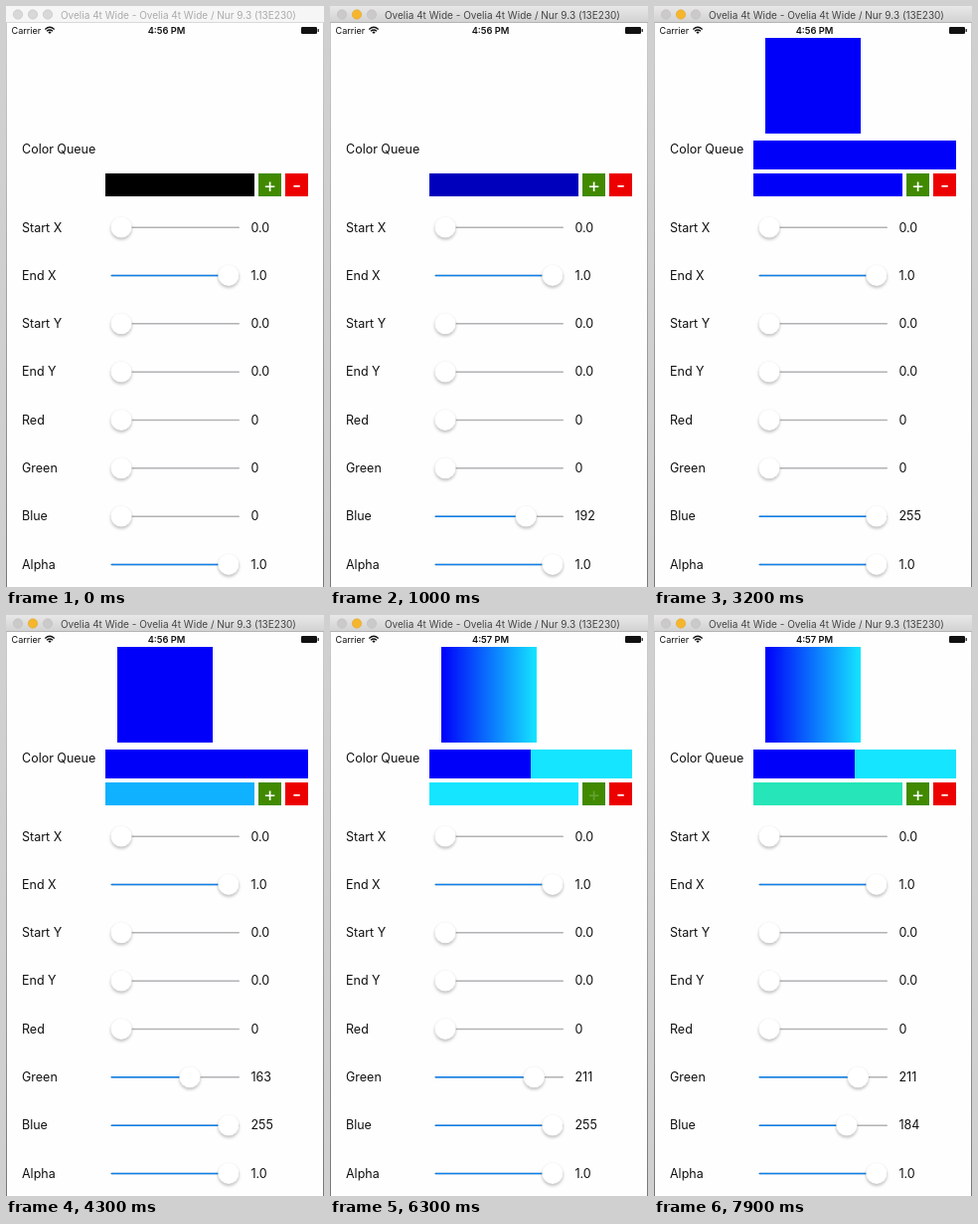
An HTML page that plays this animation: 320 px wide and 583 px high, repeating every 8000 ms.

```html
<!DOCTYPE html>
<html lang="en">
<head>
<meta charset="utf-8">
<title>Gradient editor</title>
<style>
  html, body { margin: 0; width: 100%; height: 100%; overflow: hidden; background: #fff; }
  svg { display: block; width: 100vw; height: 100vh; }
  text { font: 12.5px Inter, Roboto, sans-serif; fill: #111; }
  .title { font-size: 10px; text-anchor: middle; }
  .carrier { font-size: 9.1px; }
  .clock { font-size: 9.3px; font-weight: 600; text-anchor: middle; }
  .sign { font-size: 20px; text-anchor: middle; fill: #fff; }
  .thumb { fill: #fff; filter: drop-shadow(0 2px 1.6px rgba(0, 0, 0, .24)); stroke: #000; stroke-opacity: .05; stroke-width: .5; }
</style>
</head>
<body>
<svg viewBox="0 0 320 583" preserveAspectRatio="none">
  <defs>
    <linearGradient id="bar" x2="0" y2="1">
      <stop stop-color="#e8e8e8"/><stop offset="1" stop-color="#d1d1d1"/>
    </linearGradient>
    <linearGradient id="blend">
      <stop stop-color="#0000fa"/><stop id="blendEnd" offset="1"/>
    </linearGradient>
    <linearGradient id="edge" x2="0" y2="1">
      <stop stop-color="#ccc"/><stop offset="1" stop-color="#777"/>
    </linearGradient>
  </defs>
  <rect width="320" height="583" fill="#fefefe"/>
  <rect y="17" width="1" height="566" fill="url(#edge)"/>
  <rect x="319" y="17" width="1" height="566" fill="url(#edge)"/>

  <rect id="titleBar" width="320" height="17"/>
  <rect id="titleLine" y="16" width="320" height="1"/>
  <g id="lights" stroke-width=".5">
    <circle cx="12" cy="8.5" r="4.7"/>
    <circle cx="27" cy="8.5" r="4.7"/>
    <circle cx="42" cy="8.5" r="4.7"/>
  </g>
  <text id="title" class="title" x="173.5" y="12.5">Ovelia 4t Wide - Ovelia 4t Wide / Nur 9.3 (13E230)</text>

  <text class="carrier" x="5.5" y="28">Carrier</text>
  <g fill="none" stroke="#111" stroke-width="1.3">
    <path d="M39.3 23.4Q44 19.2 48.7 23.4M41 25.3Q44 22.7 47 25.3"/>
    <path d="M42.4 26.2Q44 25 45.6 26.2L44 28Z" fill="#111" stroke="none"/>
  </g>
  <text id="clock" class="clock" x="161.5" y="28"></text>
  <rect x="297" y="21" width="16" height="7" rx="1.3" fill="#111"/>
  <rect x="313.6" y="23" width="1.2" height="3" rx=".5" fill="#111"/>

  <g id="result">
    <rect x="112" y="32" width="96" height="96" fill="url(#blend)"/>
    <rect x="100" y="135" width="204" height="29" fill="#0000fa"/>
    <rect id="second" x="202" y="135" width="102" height="29"/>
  </g>
  <text x="16" y="148">Color Queue</text>
  <rect id="swatch" x="100" y="168" width="150" height="23"/>
  <rect x="254" y="168" width="23" height="23" fill="#418a00"/>
  <rect x="281" y="168" width="23" height="23" fill="#ec0000"/>
  <text id="plus" class="sign" x="265.5" y="187">+</text>
  <text class="sign" x="292.5" y="187">-</text>
  <g id="rows"></g>
</svg>
<script>
const LOOP = 8000;
const SPLIT_TIME = 6300;
const $ = id => document.getElementById(id);
const set = (el, attrs) => {
  for (const name in attrs) el.setAttribute(name, attrs[name]);
};

function add(parent, tag, attrs) {
  const el = document.createElementNS('http://www.w3.org/2000/svg', tag);
  set(el, attrs);
  return parent.appendChild(el);
}

function makeSlider(label, index, max, digits) {
  const y = 222 + index * 48.33;
  const rows = $('rows');
  add(rows, 'text', { x: 16, y: y + 4.5 }).textContent = label;
  const track = { x: 105.5, y: y - .6, height: 1.5, rx: .7 };
  add(rows, 'rect', { ...track, width: 129.5, fill: '#b2b2b5' });
  const fill = add(rows, 'rect', { ...track, fill: '#0b7fe9' });
  const thumb = add(rows, 'circle', { class: 'thumb', cy: y, r: 10.6 });
  const number = add(rows, 'text', { x: 246.5, y: y + 4.5 });
  return value => {
    const x = 116 + 108 * value / max;
    set(fill, { width: Math.max(0, x - 105.5) * (value > 0) });
    set(thumb, { cx: x });
    number.textContent = value.toFixed(digits);
  };
}

const [startX, endX, startY, endY] = ['Start X', 'End X', 'Start Y', 'End Y']
  .map((label, i) => makeSlider(label, i, 1, 1));
const [red, green, blue] = ['Red', 'Green', 'Blue']
  .map((label, i) => makeSlider(label, i + 4, 255, 0));
const alpha = makeSlider('Alpha', 7, 1, 1);
[startX, startY, endY, red].forEach(slider => slider(0));
[endX, alpha].forEach(slider => slider(1));

// Keys are [time, value] pairs joined by straight lines.
function track(keys, t) {
  const next = keys.findIndex(key => key[0] > t);
  if (next < 0) return keys[keys.length - 1][1];
  if (next === 0) return keys[0][1];
  const [t0, v0] = keys[next - 1], [t1, v1] = keys[next];
  return v0 + (v1 - v0) * (t - t0) / (t1 - t0);
}

const greenKeys = [[3500, 0], [4300, 163], [5100, 211]];
const blueKeys = [[200, 0], [600, 128], [1400, 255], [7000, 255], [7900, 184]];
const plusKeys = [[1999, 1], [2000, .2], [2200, .2], [2600, 1],
  [6099, 1], [6100, .2], [6300, .2], [6700, 1]];

function shown(g, b) {
  const r = g * .1 + (255 - b) * .24 * g / 211;
  return `rgb(${r | 0}, ${Math.min(255, g * 1.09) | 0}, ${b * (.98 + g / 10000) | 0})`;
}

function draw(t) {
  const g = Math.round(track(greenKeys, t));
  const b = Math.round(track(blueKeys, t));
  green(g);
  blue(b);
  set($('swatch'), { fill: shown(g, b) });
  set($('plus'), { 'fill-opacity': track(plusKeys, t) });

  const split = t >= SPLIT_TIME;
  const cyan = shown(211, 255);
  set($('result'), { visibility: t >= 2200 ? 'visible' : 'hidden' });
  set($('second'), { fill: split ? cyan : '#0000fa' });
  set($('blendEnd'), { 'stop-color': split ? cyan : '#0000fa' });
  $('clock').textContent = t < 5900 ? '4:56 PM' : '4:57 PM';

  const active = t >= 100;
  set($('titleBar'), { fill: active ? 'url(#bar)' : '#f6f6f6' });
  set($('titleLine'), { fill: active ? '#b4b4b4' : '#d9d9d9' });
  set($('title'), { style: `fill: ${active ? '#444' : '#aaa'}` });
  [...$('lights').children].forEach((light, i) => {
    const yellow = active && i === 1;
    set(light, { fill: yellow ? '#f6b62c' : active ? '#cbc9c9' : '#d8d8d8',
      stroke: yellow ? '#dda02a' : '#bbb' });
  });
}

const begin = performance.now();
function tick() {
  const t = (performance.now() - begin) % LOOP;
  draw(Math.floor(t / 100) * 100);
  requestAnimationFrame(tick);
}
tick();
</script>
</body>
</html>
```
